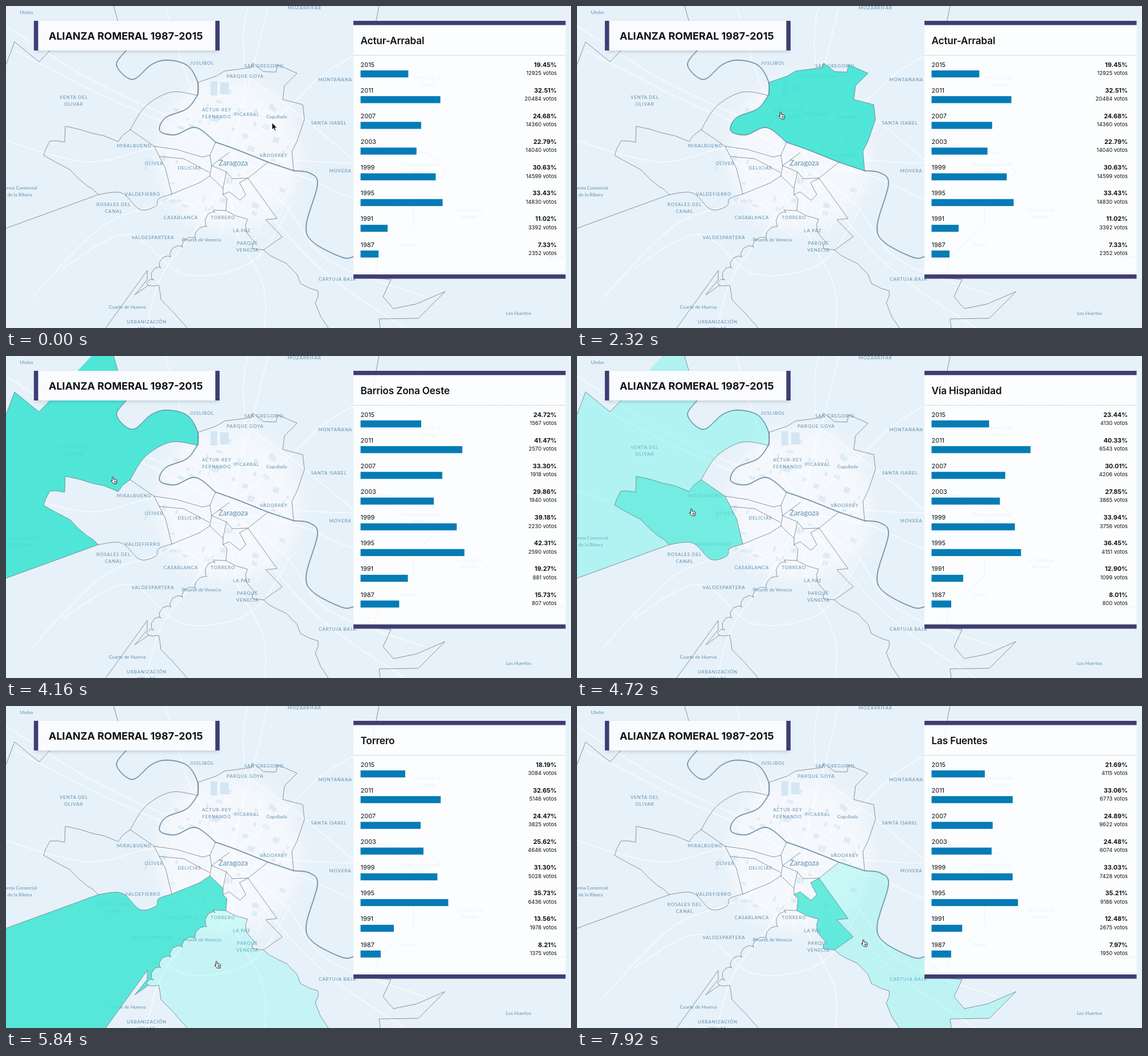
Recreate the animation shown at these times as an HTML page. Size 992 by 565 pixels, loop 8 s.

```html
<!DOCTYPE html>
<html lang="es">
<head>
<meta charset="utf-8">
<style>
  html, body { margin: 0; width: 100%; height: 100%; overflow: hidden; background: #e7f1f9; }
  svg { display: block; width: 100%; height: 100%; }
  text { font-family: Inter, sans-serif; fill: #111; }
  path { fill: none; stroke-linejoin: round; stroke-linecap: round; }
  #labels text { font-family: Lato, sans-serif; fill: #5f8fae; text-anchor: middle; }
  #labels .caps { letter-spacing: .85px; }
  #zones path { fill-opacity: .9; }
  #borders path { stroke: #6d7986; stroke-width: .8; }
  #river path { stroke: #bdd6e6; stroke-width: 2.6; }
  #river .bank { stroke: #7493aa; stroke-width: 1; }
  #roads path { stroke: #fff; stroke-opacity: .6; stroke-width: 2; }
  #streets path { stroke: #fff; stroke-opacity: .7; stroke-width: .8; }
  .end { text-anchor: end; }
</style>
</head>
<body>
<svg viewBox="0 0 992 565" preserveAspectRatio="none">
  <defs>
    <filter id="soft"><feGaussianBlur stdDeviation="14"/></filter>
    <filter id="shadow" x="-10%" y="-10%" width="120%" height="125%"><feGaussianBlur stdDeviation="3"/></filter>
  </defs>
  <rect width="992" height="565" fill="#e7f1f9"/>
  <ellipse cx="390" cy="260" rx="125" ry="135" fill="#f4f8fc" filter="url(#soft)"/>
  <g id="blocks"></g>
  <g id="roads"></g>
  <g id="streets"></g>
  <g id="river"></g>
  <g id="labels"></g>
  <g id="zones"></g>
  <g id="borders"></g>

  <rect x="51" y="29" width="322" height="51" fill="#456" opacity=".25" filter="url(#shadow)"/>
  <rect x="49" y="26" width="326" height="52" fill="#403d73"/>
  <rect x="56.500" y="26" width="311" height="52" fill="#f9fbfe"/>
  <text x="75" y="59" font-size="18" font-weight="700">ALIANZA ROMERAL 1987-2015</text>

  <rect x="610" y="26" width="372.500" height="452" fill="#fff" opacity=".87"/>
  <path d="M610 26h372.500v7.500h-372.500zM610 471h372.500v7.500h-372.500z" style="fill:#403d73"/>
  <path d="M610 86.500H982" stroke="#c3cad2" stroke-dasharray="1 1.500"/>
  <text id="title" x="622.500" y="67" font-size="17.200" font-weight="600" letter-spacing="-.15"></text>
  <g id="rows"></g>

  <path id="arrow" d="M0 0V12L3 9.500L5 14L7 13L5 8.800H8.800Z" style="fill:#111;stroke:#fff;stroke-width:.8"/>
  <path id="hand" d="M2.500 8V1.500Q3.500 0 4.700 1.500V5L9.500 6Q11 6.500 10.800 8L10 13H4.500L.3 8.300Q0 6.500 2.500 8Z M6.300 8V11M8.200 8V11" style="fill:#fff;stroke:#222"/>
</svg>
<script>
const $ = id => document.getElementById(id);
const clamp = v => Math.max(0, Math.min(1, v));
const pts = s => s.split(' ').map(p => p.split(',').map(Number));
const line = p => 'M' + p.map(q => q.join(' ')).join('L');
const path = (p, cls = '') => `<path class="${cls}" d="${line(p)}"/>`;
let seed = 11;
const rnd = () => (seed = seed * 16807 % 2147483647) / 2147483647;

// Catmull-Rom curve through the points
function smooth(p, steps = 6) {
  const out = [];
  for (let i = 0; i < p.length - 1; i++) {
    const a = p[i - 1] || p[i], b = p[i], c = p[i + 1], d = p[i + 2] || c;
    for (let k = 0; k < steps; k++) {
      const u = k / steps;
      out.push([0, 1].map(j => b[j] + .5 * u * (c[j] - a[j] + u * (2 * a[j] - 5 * b[j] + 4 * c[j] - d[j]
        + u * (3 * (b[j] - c[j]) + d[j] - a[j])))));
    }
  }
  return [...out, p.at(-1)];
}
// Ragged edge: a jittered point in the middle of every stretch
const rough = p => p.flatMap((a, i) => {
  const b = p[i + 1];
  return b ? [a, a.map((v, j) => (v + b[j]) / 2 + (rnd() - .5) * 6)] : [a];
});
// Winding stream; both ends stay in place
const wind = p => smooth(p, 9).map(([x, y], i, all) =>
  i && i < all.length - 1 ? [x + 5 * Math.sin(i * 1.2), y + 5 * Math.cos(i * 1.2)] : [x, y]);

const curve = s => smooth(pts(s)), ragged = s => rough(pts(s));
const arcs = {
  riv1: curve('211,78 194,104 222,129 255,103 283,95 318,104 336,132 337,155'),
  riv2: curve('337,155 318,180 280,196 270,219 297,226 333,213 368,239'),
  riv3: curve('368,239 405,252 460,274'),
  riv4: curve('460,274 505,289'),
  riv5: curve('505,289 533,293 547,313 527,385 540,415 590,441 610,440'),
  actN: pts('337,155 337,134 369,123 384,114 431,108 433,100 452,115 474,116 477,103 511,118 489,140 486,164 521,173 524,199 511,237 502,255 505,289'),
  almN: curve('218,217 245,176 290,151 337,157'),
  almS: pts('260,246 300,252 345,265 358,262 368,239'),
  hisW: ragged('218,217 197,238 150,223 104,211 103,239 77,237 66,262 112,287 143,316 162,331'),
  hisS: curve('162,331 203,328 235,357 263,351 268,338 291,330'),
  hisE: pts('218,217 260,246'),
  hisF: pts('260,246 280,285 291,330'),
  road: pts('162,331 0,390'),
  edge: pts('0,390 0,103 15,63 58,98 150,0 189,0 211,78'),
  casN: pts('291,330 340,310 358,298'),
  casE: pts('358,298 381,320 381,331'),
  casF: pts('381,331 388,338 386,359'),
  torN: pts('386,359 364,358'),
  huer: wind(pts('364,358 338,398 300,425 268,457 250,490')),
  cuar: pts('250,490 226,507 248,480 248,464 175,565'),
  torS: ragged('250,490 268,490 272,515 318,565'),
  sjW: ragged('386,359 424,374 423,398 437,414 433,426 452,428'),
  torE: ragged('452,428 480,446 500,460 517,487 548,500 543,521 566,565'),
  sjN: pts('381,331 392,326 411,341 421,331 410,310 425,302'),
  sjE: pts('425,302 440,323 476,373 456,375 485,405 452,428'),
  lfN: pts('425,302 460,274'),
  lfS: pts('610,440 648,477 676,480 662,510 680,531 720,523 771,501 724,548 655,549 657,565'),
  base: pts('175,565 0,565')
};
// Outline from arc names; a minus runs the arc backwards
const ring = keys => keys.split(' ').flatMap(k => k[0] === '-' ? [...arcs[k.slice(1)]].reverse() : arcs[k]);

// start, name, outline, percentages and votes from 2015 back to 1987
const zones = [
  [400, 'Actur-Arrabal', 'actN -riv4 -riv3 -riv2',
    [19.45, 32.51, 24.68, 22.79, 30.63, 33.43, 11.02, 7.33], [12925, 20484, 14360, 14040, 14599, 14830, 3392, 2352]],
  [2500, 'La Almozara', 'almN riv2 -almS -hisE'],
  [3600, 'Barrios Zona Oeste', 'riv1 -almN hisW road edge',
    [24.72, 41.47, 33.30, 29.86, 39.18, 42.31, 19.27, 15.73], [1567, 2570, 1918, 1940, 2230, 2590, 881, 807]],
  [4400, 'Vía Hispanidad', 'hisE hisF -hisS -hisW',
    [23.44, 40.33, 30.01, 27.85, 33.94, 36.45, 12.90, 8.01], [4130, 6543, 4206, 3865, 3756, 4151, 1099, 800]],
  [5150, 'Casablanca', '-road hisS casN casE casF torN huer cuar base'],
  [5680, 'Torrero', 'torN huer torS -torE -sjW',
    [18.19, 32.65, 24.47, 25.62, 31.30, 35.73, 13.56, 8.21], [3084, 5146, 3825, 4646, 5028, 6436, 1978, 1375]],
  [7040, 'San José', 'sjN sjE -sjW -casF',
    [26.55, 40.11, 32.50, 31.60, 41.24, 45.38, 20.22, 13.14], [8045, 12416, 10187, 11546, 13698, 17726, 6653, 4835]],
  [7740, 'Las Fuentes', 'lfN riv4 riv5 lfS -torE -sjE',
    [21.69, 33.06, 24.89, 24.48, 33.03, 35.21, 12.48, 7.97], [4115, 6773, 9622, 6074, 7428, 9186, 2675, 1950]]
].map(([from, name, keys, pct, votes]) => ({ from, name, keys, pct, votes }));
// Zones without figures take the mean of their neighbours
zones.forEach((z, i) => {
  for (const k of ['pct', 'votes'])
    z[k] ??= zones[i - 1][k].map((v, j) => (v + zones[i + 1][k][j]) / 2);
});
$('zones').innerHTML = zones.map(z => path(ring(z.keys))).join('');
const fills = [...$('zones').children];

const { edge, base, ...lines } = arcs;
const inner = ['189,0 211,78', '0,103 15,63 58,98 102,52', '358,262 361,280 358,298', '361,280 387,291 397,303 425,302',
  '361,280 392,257', '269,264 312,268 357,292', '387,291 381,320', '655,0 641,70 628,88', '640,240 745,260 770,292 715,350 716,385 655,440 645,478'];
$('borders').innerHTML = [...Object.values(lines), ...inner.map(pts)].map(p => path(p)).join('');
$('river').innerHTML = Object.keys(arcs).filter(k => k.startsWith('riv'))
  .map(k => path(arcs[k]) + path(arcs[k], 'bank')).join('');

const polar = (r, a) => [390 + r * Math.cos(a), 270 + r * Math.sin(a)];
const roads = ['0,35 150,130 300,200', '460,0 433,110 403,230 400,290', '430,128 520,195 610,270',
  '100,460 215,400 310,470 430,450 500,350', '400,290 545,455 700,565'].map(curve);
for (let a = 0; a < 6; a += .6)
  roads.push(smooth([30, 130, 250, 420].map(r => polar(r, a + rnd() * .3))));
$('roads').innerHTML = roads.map(p => path(p)).join('');

let streets = '', blocks = '';
for (let i = 0; i < 190; i++) {
  const [x, y] = polar(Math.sqrt(rnd()) * 135, rnd() * 6.28);
  const dir = .35 + (i % 2) * 1.57 + rnd() * .3, n = 8 + rnd() * 22;
  streets += path([[x, y], [x + Math.cos(dir) * n, y + Math.sin(dir) * n]]);
  if (i % 4 === 0)
    blocks += `<rect x="${x - 20}" y="${y}" width="${3 + rnd() * 9}" height="${3 + rnd() * 8}" fill="#d6e7f4" opacity=".75" transform="rotate(15 ${x} ${y})"/>`;
}
$('streets').innerHTML = streets;
$('blocks').innerHTML = blocks + '<path d="M359 132h12v25h-12zM376 134h15v21h-15z" style="fill:#d3e6f4"/>';

// text ("/" breaks the line), centre, baseline
const labels = `MOZARRIFAR 524,6|JUSLIBOL 344,103|SAN GREGORIO 453,108|PARQUE GOYA 420,126|MONTAÑANA 578,132
|VENTA DEL/OLIVAR 119,163|ACTUR-REY/FERNANDO 370,185|PICARRAL 423,193|Cogullada 475,197|SANTA ISABEL 567,208
|MIRALBUENO 225,248|OLIVER 260,279|DELICIAS 322,287|Zaragoza 399,280|VADORREY 470,265|MOVERA 587,292
|VALDEFIERRO 240,333|ROSALES DEL/CANAL 189,351|CASABLANCA 307,374|TORRERO 381,374|LA PAZ 414,397
|PARQUE/VENECIA 424,419|Pinares de Venecia 343,413|VALDESPARTERA 258,409|CARTUJA BAJA 582,482
|Cuarte de Huerva 213,531|URBANIZACIÓN/VILLAS 247,557|Utebo 36,14|Los Huertos 900,542
|forma Comercial/de la Ribera 24,322|Villamayor de/Gállego 741,129|Polígono Industrial/Malpica 728,281
|La Puebla de/Alfindén 814,361|Pastriz 707,422|Alfajarín 966,443`.split('|');
$('labels').innerHTML = labels.map(label => {
  const [, name, x, y] = label.trim().match(/(.+) (\d+),(\d+)/);
  const caps = name === name.toUpperCase();
  const size = name === 'Zaragoza' ? 13 : caps ? 8 : 8.4;
  return name.split('/').map((s, i) =>
    `<text x="${x}" y="${+y + i * 11.5}" class="${caps ? 'caps' : ''}" font-size="${size}">${s}</text>`).join('');
}).join('');

function showPanel({ name, pct, votes }) {
  $('title').textContent = name;
  $('rows').innerHTML = pct.map((p, i) => `<g transform="translate(0 ${i * 45.15})">
    <text x="622.5" y="106.5" font-size="11">${2015 - 4 * i}</text>
    <rect x="622.5" y="113" width="${p * 4.31}" height="12.3" fill="#047cb5"/>
    <text class="end" x="967" y="106.5" font-size="10.8" font-weight="700">${p.toFixed(2)}%</text>
    <text class="end" x="967" y="121" font-size="9.4">${Math.round(votes[i])} votos</text></g>`).join('');
}

// time, x, y of the pointer
const track = pts('0,467,205 500,467,205 1200,448,192 3500,255,178 3680,173,163 4720,197,267 5840,366,447 7120,431,387 7920,499,409 8000,504,411');
function pointer(t) {
  const i = track.findIndex(k => k[0] > t), a = track[i - 1], b = track[i];
  const u = (t - a[0]) / (b[0] - a[0]);
  return [a[1] + (b[1] - a[1]) * u, a[2] + (b[2] - a[2]) * u];
}

let shown = -1;
function draw(t) {
  const current = Math.max(0, zones.findLastIndex(z => z.from <= t));
  if (current !== shown) showPanel(zones[shown = current]);
  zones.forEach((z, i) => {
    const next = zones[i + 1]?.from ?? Infinity;
    const o = clamp((t - z.from - 80) / 300) * (1 - clamp((t - next - 150) / 300));
    fills[i].style.opacity = o;
    fills[i].style.fill = `color-mix(in srgb, #3fe5d4 ${o * 100}%, #6cfff2)`;
  });
  const over = t >= zones[0].from;
  for (const [id, on] of [['hand', over], ['arrow', !over]]) {
    $(id).setAttribute('transform', `translate(${pointer(t)})`);
    $(id).style.display = on ? '' : 'none';
  }
}
const start = performance.now();
function tick() {
  draw((performance.now() - start) % 8000);
  requestAnimationFrame(tick);
}
tick();
</script>
</body>
</html>
```
